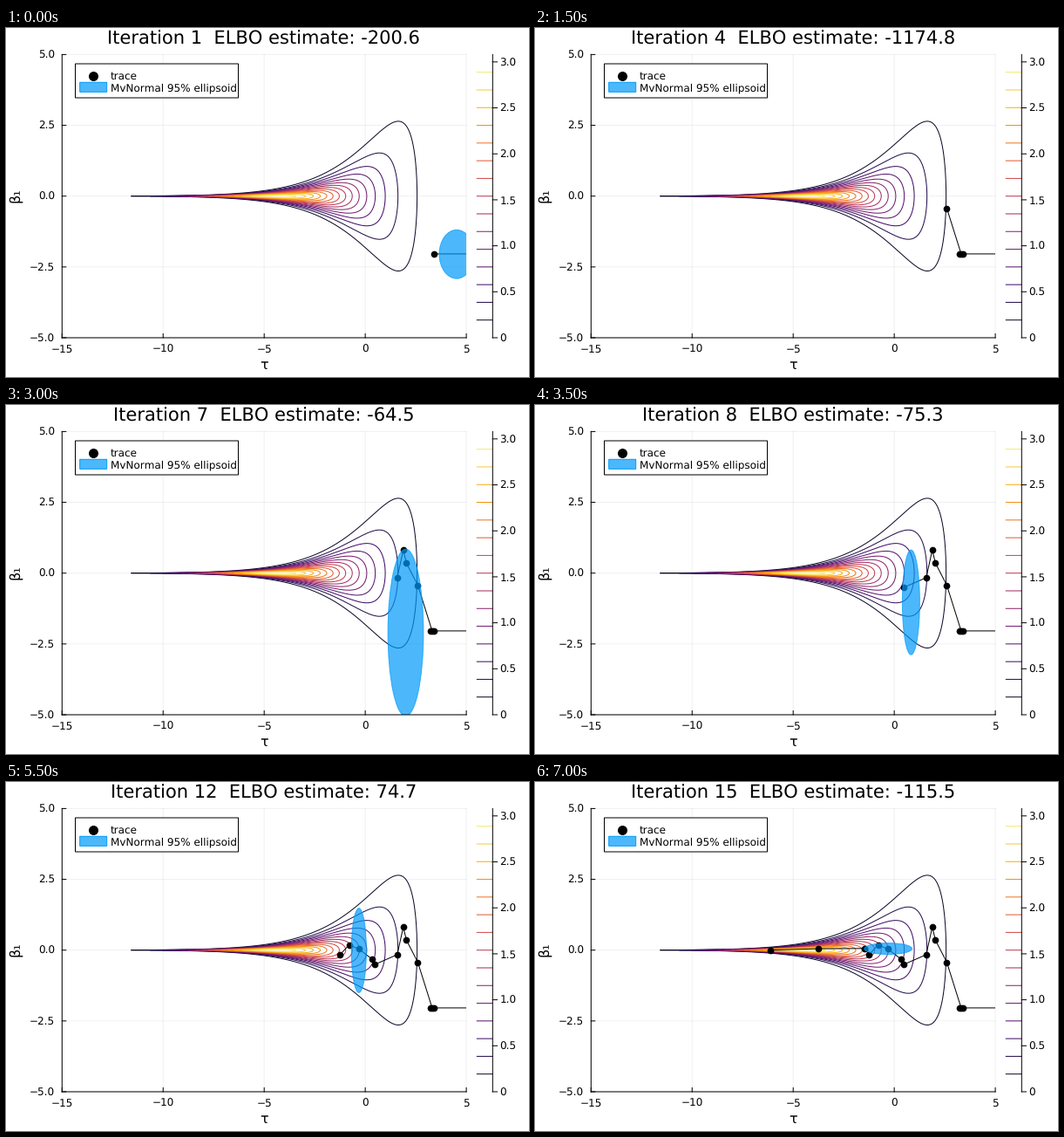
These frames come from a looping animation (600x400 px, 7.5 s). A matplotlib script:

```python
import numpy as np
import matplotlib.pyplot as plt
from matplotlib.animation import FuncAnimation
from matplotlib.patches import Ellipse, Rectangle

W, H, DPI = 600, 400, 100
PX = 72 / DPI                                   # points per pixel
LEFT, RIGHT, TOP, BOTTOM = 64.3, 528.1, 30.4, 355
BLUE = "#009AFA"
LEVELS = 16
Z_MAX = np.exp(1.125)                           # peak of the funnel density
STEPS = 15

plt.rcParams.update({"font.family": "DejaVu Sans", "text.hinting": "none",
                     "text.hinting_factor": 1, "path.snap": False})

# Optimiser path in (tau, beta); it starts outside the axes
PATH = np.array([
    (9, -2.04), (3.41, -2.04), (3.21, -2.04), (3.31, -2.04), (2.6, -0.43),
    (2.04, 0.35), (1.88, 0.81), (1.58, -0.16), (0.46, -0.51), (0.32, -0.31),
    (-0.31, 0.04), (-0.8, 0.18), (-1.25, -0.16), (-1.46, 0.06),
    (-3.77, 0.05), (-6.15, 0)])

# Key fits: iteration, ELBO, ellipse centre (tau, beta) and radii
FITS = np.array([
    (1, -200.6, 4.52, -2.05, 0.86, 0.86),
    (4, -1174.8, 2.7, -1, 0, 0),
    (6, -41.7, 2.23, 0.57, 0.18, 1.33),
    (7, -64.5, 2, -2.1, 0.88, 2.95),
    (8, -75.3, 0.83, -1.03, 0.43, 1.85),
    (10, 72.6, 0.43, -0.15, 0.35, 2.13),
    (13, 75.7, -0.69, 0.06, 0.38, 1.17),
    (15, -115.5, -0.3, 0.05, 1.18, 0.2)])


def px(tau):
    return LEFT + (tau + 15) / 20 * (RIGHT - LEFT)


def py(beta):
    return BOTTOM - (beta + 5) / 10 * (BOTTOM - TOP)


def pz(z):
    return BOTTOM - z / Z_MAX * (BOTTOM - TOP)


def line(x, y, color="black", **kw):
    return ax.plot(x, y, color=color, lw=PX, **kw)[0]


def text(x, y, s, size=11.75, ha="left", **kw):
    return ax.text(x, y, s, fontsize=size * PX, ha=ha, va="baseline", **kw)


def label(v, digits):
    return f"{v:.{digits}f}".replace("-", "\u2212")


fig = plt.figure(figsize=(W / DPI, H / DPI), dpi=DPI, facecolor="white")
ax = fig.add_axes([0, 0, 1, 1])
ax.set(xlim=(0, W), ylim=(H, 0))
ax.axis("off")


def draw_axes():
    for tau in range(-15, 6, 5):
        x = px(tau)
        line([x, x], [TOP, BOTTOM], alpha=0.06, zorder=1)
        line([x, x], [BOTTOM, BOTTOM - 4.5], zorder=6)
        text(x, 371.5, label(tau, 0), ha="center")
    for beta in np.arange(-5, 5.1, 2.5):
        y = py(beta)
        line([LEFT, RIGHT], [y, y], alpha=0.06, zorder=1)
        line([LEFT, LEFT + 4.5], [y, y], zorder=6)
        text(56.1, y + 4.6, label(beta, 1), ha="right")
    line([LEFT, LEFT], [TOP, BOTTOM], zorder=6)
    line([LEFT, RIGHT], [BOTTOM, BOTTOM], zorder=6)
    text(296, 391, "τ", 16.2, ha="center")
    text(15.4, py(0) - 1.5, "β₁", 16.2, ha="center", rotation=90,
         rotation_mode="anchor")


def draw_contours():
    # Level sets of exp(-(tau²/9 + tau + beta² exp(-tau)) / 2)
    u = np.linspace(0, 2 * np.pi, 500)
    for i in range(1, LEVELS):
        color = plt.cm.inferno(i / LEVELS)
        r = 3 * np.sqrt(-2 * np.log(i / LEVELS))
        tau = -4.5 - r * np.cos(u)
        beta = np.exp(tau / 2) * r * np.sin(u) / 3
        line(px(tau), py(beta), color, zorder=2)
        y = pz(Z_MAX * i / LEVELS)
        line([540.3, 558], [y, y], color, zorder=2)


def draw_colorbar_axis():
    line([558.3, 558.3], [TOP, BOTTOM], zorder=6)
    for z in np.arange(0, 3.1, 0.5):
        y = pz(z)
        line([558.3, 563.5], [y, y], zorder=6)
        text(566.2, y + 4.6, f"{z:.1f}" if z else "0")


def draw_legend():
    ax.add_patch(Rectangle((79.5, 41), 187, 39, fc="white", ec="black",
                           lw=PX, zorder=7))
    ax.plot(100, 54.5, "o", color="black", ms=11 * PX, mew=0, zorder=8)
    for style in ({"fc": BLUE, "alpha": 0.7, "lw": 0},
                  {"fill": False, "ec": BLUE, "lw": PX}):
        ax.add_patch(Rectangle((84.7, 62.3), 31, 11, zorder=8, **style))
    text(120, 58.8, "trace", zorder=8)
    text(120, 72.1, "MvNormal 95% ellipsoid", zorder=8)


draw_axes()
draw_contours()
draw_colorbar_axis()
draw_legend()

frame = Rectangle((LEFT, TOP), RIGHT - LEFT, BOTTOM - TOP, fc="none", ec="none")
ax.add_patch(frame)
trace = line([], [], zorder=3, marker="o", ms=7.7 * PX, mew=0)
ellipse = Ellipse((0, 0), 1, 1, fc=BLUE, ec=BLUE, alpha=0.7, lw=PX, zorder=4)
ax.add_patch(ellipse)
for artist in (trace, ellipse):
    artist.set_clip_path(frame)
title = text(295.9, 19.2, "", 20.57, ha="center")


def update(i):
    k = i + 1
    elbo, tau, beta, rt, rb = (np.interp(k, FITS[:, 0], col)
                               for col in FITS.T[1:])
    title.set_text(f"Iteration {k}  ELBO estimate: {elbo:.1f}")
    t, b = PATH[:k + 1].T
    trace.set_data(px(t), py(b))
    ellipse.set(center=(px(tau), py(beta)), width=2 * (px(rt) - px(0)),
                height=2 * (py(0) - py(rb)), visible=rt > 0)
    return title, trace, ellipse


anim = FuncAnimation(fig, update, frames=STEPS, interval=500, repeat=True,
                     repeat_delay=0)
plt.show()
```
